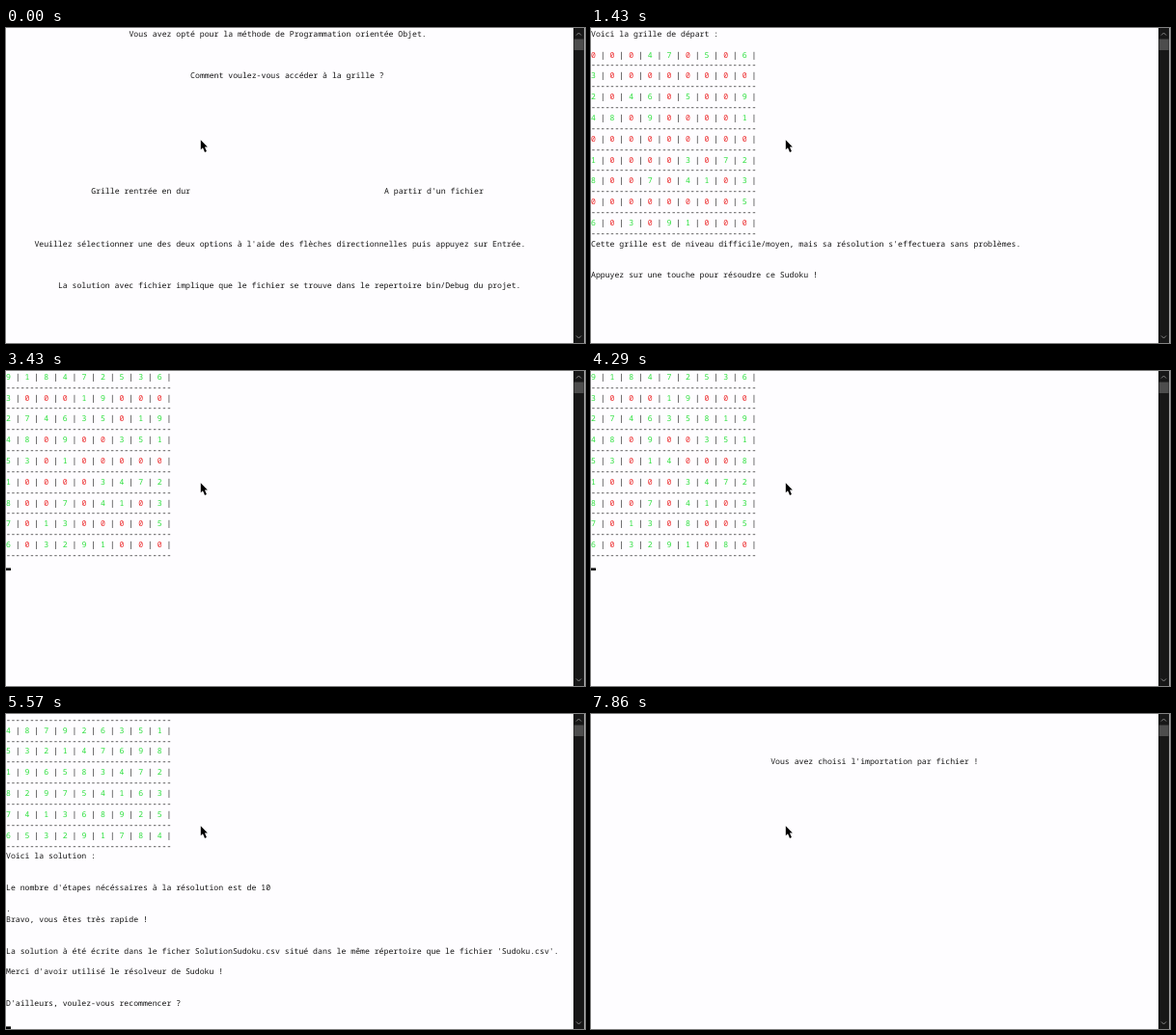
Write an HTML page that moves like this. It is 600 px wide and 327 px high and loops after 8 s.

```html
<!DOCTYPE html>
<html lang="fr">
<head>
<meta charset="utf-8">
<title>Résolveur de Sudoku</title>
<style>
  html, body { margin: 0; width: 100%; height: 100%; overflow: hidden; background: #fefdff; }
  svg { display: block; width: 100vw; height: 100vh; }
  text {
    font: 8.1667px "Noto Sans Mono", "DejaVu Sans Mono", monospace;
    white-space: pre;
    text-rendering: geometricPrecision;
  }
</style>
</head>
<body>
<svg viewBox="0 0 600 327" preserveAspectRatio="none">
  <rect width="600" height="327" fill="#fefdff"/>
  <g id="screen" fill="#141414"></g>
  <rect x="588" width="11.4" height="327" fill="#171717"/>
  <rect x="588.6" y="11.5" width="10" height="11.5" fill="#4d4d4d"/>
  <path d="M591 7.5l2.5-2.5 2.5 2.5M591 319.5l2.5 2.5 2.5-2.5" fill="none" stroke="#858585"/>
  <path d="M201.8 116.3v10l2.2-2 2 4.6 1.9-.8-2-4.5h2.9z" fill="#000"/>
</svg>
<script>
const LOOP = 8000, COL = 4.9, ROW = 10.9;
const RED = '#ec2a2c', GREEN = '#2bdf3c';
const screen = document.getElementById('screen');

const solution = ['918472536', '365819247', '274635819', '487926351', '532147698',
                  '196583472', '829754163', '741368925', '653291784'];
// Solver step that finds each digit; 0 marks a given digit.
const foundAt = ['123002010', '098942989', '050010640', '008089210', '129579896',
                 '099880300', '089080090', '294196880', '080500978'];

const put = (col, row, str, color) =>
  `<text x="${(col * COL).toFixed(1)}" y="${(row * ROW + 8.7).toFixed(1)}"` +
  `${color ? ` fill="${color}"` : ''}>${str}</text>`;

const caret = row => `<rect y="${((row + 1) * ROW - 2.6).toFixed(1)}" width="5" height="2.6" fill="#000"/>`;

const dashes = row => put(0, row, '-'.repeat(35));

function grid(top, step, first = 0) {
  let out = '';
  for (let r = first; r < 9; r++) {
    const row = top + 2 * (r - first);
    out += put(0, row, '  | '.repeat(9).trimEnd()) + dashes(row + 1);
    for (let c = 0; c < 9; c++) {
      const known = +foundAt[r][c] <= step;
      out += put(c * 4, row, known ? solution[r][c] : '0', known ? GREEN : RED);
    }
  }
  return out;
}

const menu = (col, method) =>
  put(col, 0, `Vous avez opté pour la méthode ${method}.`) +
  put(39, 4, 'Comment voulez-vous accéder à la grille ?') +
  put(18, 15, 'Grille rentrée en dur') +
  put(80, 15, "A partir d'un fichier") +
  put(6, 20, "Veuillez sélectionner une des deux options à l'aide des flèches directionnelles puis appuyez sur Entrée.") +
  put(11, 24, 'La solution avec fichier implique que le fichier se trouve dans le repertoire bin/Debug du projet.');

const choice = () => put(38, 4, "Vous avez choisi l'importation par fichier !");

const start = () =>
  put(0, 0, 'Voici la grille de départ :') + grid(2, 0) +
  put(0, 20, "Cette grille est de niveau difficile/moyen, mais sa résolution s'effectuera sans problèmes.") +
  put(0, 23, 'Appuyez sur une touche pour résoudre ce Sudoku !');

const result = () =>
  dashes(0) + grid(1, 10, 3) +
  put(0, 13, 'Voici la solution :') +
  put(0, 16, "Le nombre d'étapes nécéssaires à la résolution est de 10") +
  put(0, 18, '.') +
  put(0, 19, 'Bravo, vous êtes très rapide !') +
  put(0, 22, "La solution à été écrite dans le ficher SolutionSudoku.csv situé dans le même répertoire que le fichier 'Sudoku.csv'.") +
  put(0, 24, "Merci d'avoir utilisé le résolveur de Sudoku !") +
  put(0, 27, "D'ailleurs, voulez-vous recommencer ?");

// [start time, screen content]
const scenes = [
  [0, menu(26, 'de Programmation orientée Objet')],
  [430, choice()],
  [1140, start()],
  [1570, start() + caret(24)]
];
for (let k = 1; k < 10; k++) {
  scenes.push([1600 + 360 * k, grid(0, k) + (k > 2 ? caret(18) : '')]);
}
const backtracking = menu(34, 'du Backtracking');
scenes.push(
  [5200, result() + caret(29)],
  [6280, backtracking + caret(25)],
  [7000, backtracking],
  [7280, choice()]
);

let shown = -1;
function draw(now) {
  const t = now % LOOP;
  let i = scenes.length - 1;
  while (scenes[i][0] > t) i--;
  if (i !== shown) {
    shown = i;
    screen.innerHTML = scenes[i][1];
  }
}

const origin = performance.now();
function tick() {
  draw(performance.now() - origin);
  requestAnimationFrame(tick);
}
tick();
</script>
</body>
</html>
```
